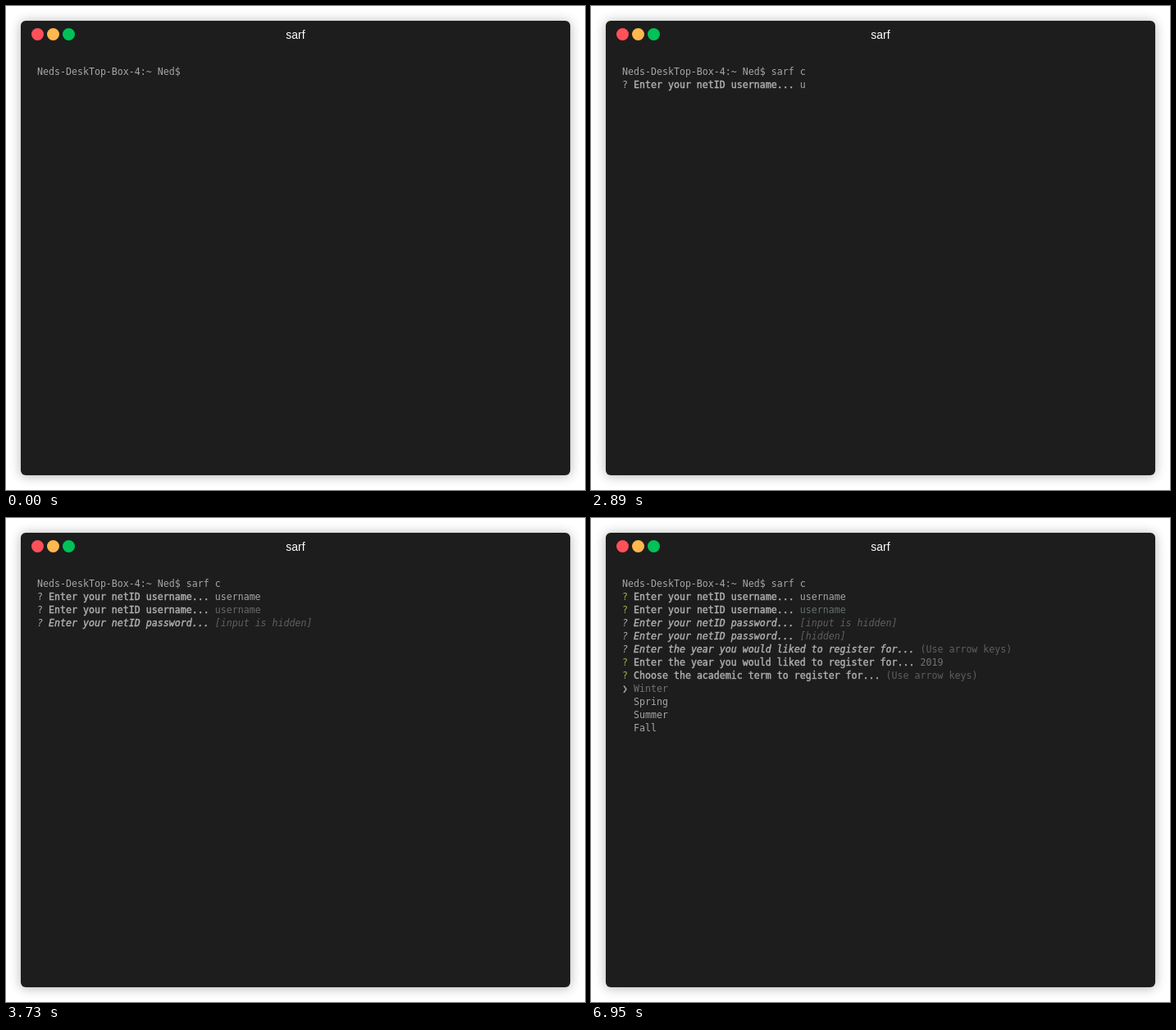
Animation of 706x590 px, one loop 8000 ms. Source, as an HTML page:

```html
<!DOCTYPE html>
<html lang="en">
<head>
<meta charset="utf-8">
<title>Terminal</title>
<style>
html, body { margin: 0; width: 100%; height: 100%; overflow: hidden; background: #fff; }
#win {
  position: absolute; left: 18px; top: 18px; width: 670px; height: 554px;
  border-radius: 6px; background: #1d1d1d; box-shadow: 0 1px 14px rgba(0, 0, 0, .3);
}
.dot { position: absolute; top: 9px; width: 15px; height: 15px; border-radius: 50%; }
#title {
  position: absolute; top: 9px; width: 100%; text-align: center; color: #fff;
  font: 14px/16px "Liberation Sans", Arial, sans-serif;
}
#screen {
  position: absolute; left: 20px; top: 54px; margin: 0; color: #a6a6a6;
  font: 11.627px/16px "DejaVu Sans Mono", monospace;
}
#screen div { height: 16px; white-space: pre; }
b { font-weight: normal; color: #b0b0b0; -webkit-text-stroke: .4px #b0b0b0; }
i { font-style: oblique; }
.dim { color: #5f5f5f; }
.pick { color: #707473; }
.answer { color: #696969; }
.teal { color: #66716f; }
.mark { color: #aaa84a; }
.arrow { display: inline-block; width: 14px; }
</style>
</head>
<body>
<div id="win">
  <div class="dot" style="left:13px;background:#ff5157"></div>
  <div class="dot" style="left:32px;background:#ffb84d"></div>
  <div class="dot" style="left:51px;background:#00c257"></div>
  <div id="title">sarf</div>
  <div id="screen"></div>
</div>
<script>
const LOOP = 8000;
const COMMAND = 'sarf c', USERNAME = 'username';
const COMMAND_KEYS = [460, 760, 865, 970, 970, 1250];
const USERNAME_KEYS = [2890, 3040, 3128, 3216, 3304, 3392, 3480, 3620];
const screenEl = document.getElementById('screen');

const typed = (text, keys, t) => text.slice(0, keys.filter(k => k <= t).length);
const span = (cls, text) => `<span class="${cls}">${text}</span>`;
const ask = (question, reply, lit) =>
  `${lit ? span('mark', '?') : '?'} <b>${question}...</b> ${reply}`;
const slanted = (question, reply) => `<i>${ask(question, reply)}</i>`;
const menu = ([first, ...rest]) => [
  span('arrow', '❯') + span('pick', first),
  ...rest.map(item => '  ' + item)
];

function linesAt(t) {
  const lit = t >= 4400;
  const user = 'Enter your netID username';
  const pass = 'Enter your netID password';
  const year = 'Enter the year you would liked to register for';
  const keysHint = span('dim', '(Use arrow keys)');
  const lines = ['Neds-DeskTop-Box-4:~ Ned$ ' + typed(COMMAND, COMMAND_KEYS, t)];

  if (t >= 1700) lines.push(ask(user, typed(USERNAME, USERNAME_KEYS, t), lit));
  if (t >= 3730) lines.push(
    ask(user, span(t < 5710 ? 'answer' : 'teal', USERNAME), lit),
    slanted(pass, span('dim', '[input is hidden]'))
  );
  if (t >= 5710) lines.push(
    slanted(pass, span('dim', '[hidden]')),
    `<i>? <b>${year}...</b></i> ${keysHint}`
  );
  if (t >= 6950) lines.push(
    ask(year, span('pick', '2019'), true),
    ask('Choose the academic term to register for', keysHint, true),
    ...menu(['Winter', 'Spring', 'Summer', 'Fall'])
  );
  else if (t >= 5710) lines.push(...menu(['2019', '2020']));
  return lines;
}

let shown = '';
const start = performance.now();
function draw() {
  const t = (performance.now() - start) % LOOP;
  const html = linesAt(t).map(line => `<div>${line}</div>`).join('');
  if (html !== shown) screenEl.innerHTML = shown = html;
  requestAnimationFrame(draw);
}
draw();
</script>
</body>
</html>
```
